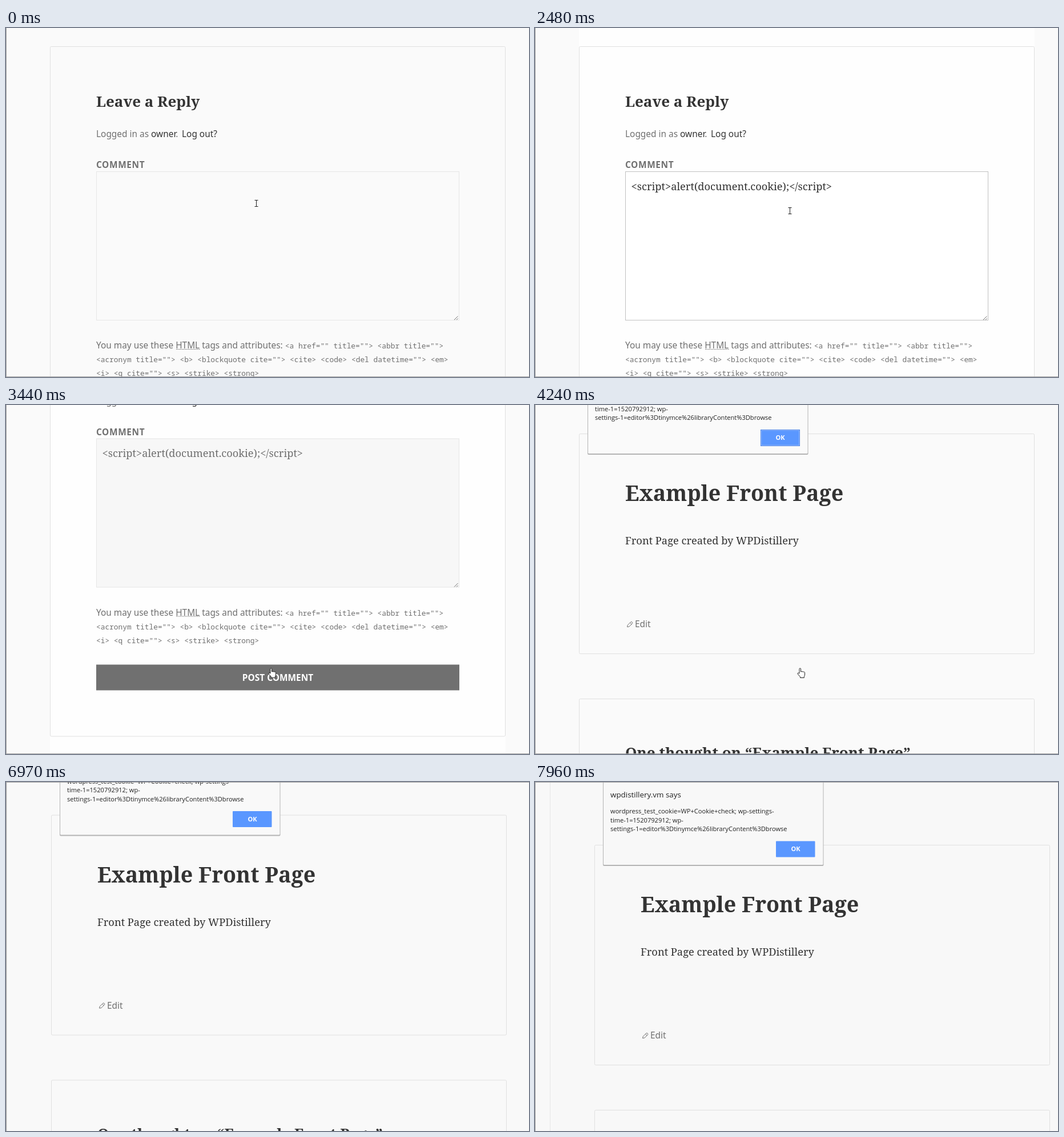
Animation, 916 px wide and 611 px high, one loop 8000 ms. Source, as an HTML page:

```html
<!DOCTYPE html>
<html lang="en">
<head>
<meta charset="utf-8">
<title>Comment form</title>
<style>
  html, body { margin: 0; width: 100%; height: 100%; overflow: hidden; background: #fafafa; }
  svg { display: block; width: 916px; height: 611px; }
  text { font: 15.42px "Noto Sans", sans-serif; fill: #707070; white-space: pre; }
  .dark { fill: #333; }
  .serif { font-family: "Noto Serif", serif; font-size: 18.25px; fill: #333; }
  .heading { font-size: 26px; font-weight: 700; }
  .title { font-size: 37.6px; font-weight: 700; }
  .label { font-weight: 700; letter-spacing: .04em; }
  .code { font: 12.85px "Noto Sans Mono", monospace; }
  .button { font-weight: 700; fill: #fff; text-anchor: middle; }
  .dialog text { font-family: "Open Sans", sans-serif; font-size: 11.1px; fill: #222; }
  .dialog .says { font-size: 13.4px; }
  .dialog .button { font-size: 11px; fill: #fff; }
  .card { fill: none; stroke: #e0e0e0; }
  .edge { fill: #a2a2a2; }
  .thin { fill: none; stroke: #707070; }
</style>
</head>
<body>
<svg viewBox="0 0 916 611">
  <rect id="backdrop" width="916" height="611"/>

  <g id="formView">
    <rect id="column" x="77" width="798" height="611" fill="#fefefe"/>
    <g id="form">
      <rect class="card" x="77.5" y="32.5" width="797" height="740" rx="2"/>
      <text class="serif heading" x="158" y="138">Leave a Reply</text>
      <text x="158" y="191">Logged in as <tspan class="dark">owner</tspan>. <tspan class="dark" x="308">Log out?</tspan></text>
      <text class="label" x="158" y="245">COMMENT</text>
      <rect id="area" x="158.5" y="251.5" width="635" height="260"/>
      <path class="thin" d="M785 511l6.5-6.5M789 511l2.5-2.5"/>
      <text id="typed" class="serif" x="168.5" y="283.5">&lt;script&gt;alert(document.cookie);&lt;/script&gt;</text>
      <rect id="caret" y="264" width="1" height="25" fill="#333"/>
      <text x="158" y="561">You may use these HTML tags and attributes: <tspan class="code">&lt;a href="" title=""&gt; &lt;abbr title=""&gt;</tspan></text>
      <path class="thin" d="M298 562.5h42" stroke-dasharray="1.5 1"/>
      <text class="code" x="158" y="585">&lt;acronym title=""&gt; &lt;b&gt; &lt;blockquote cite=""&gt; &lt;cite&gt; &lt;code&gt; &lt;del datetime=""&gt; &lt;em&gt;</text>
      <text class="code" x="158" y="609">&lt;i&gt; &lt;q cite=""&gt; &lt;s&gt; &lt;strike&gt; &lt;strong&gt;</text>
      <rect id="post" x="158" y="647" width="636" height="45"/>
      <text class="button" x="476" y="675.5">POST COMMENT</text>
    </g>
  </g>

  <g id="frontView">
    <g id="trail">
      <rect data-from="4550" x="459" y="408" width="23" height="70" fill="#f1f1f1"/>
      <rect data-from="4690" x="468" y="332" width="17" height="94" fill="#f6f6f6"/>
      <path data-from="4830" d="M472 224h27v107h-31v-19h4z" fill="#fefefe"/>
      <rect data-from="4970" x="485" y="88" width="59" height="153" fill="#fefefe"/>
      <rect data-from="5110" x="531" y="50" width="42" height="56" fill="#fefefe"/>
      <rect data-from="5110" x="531" y="15" width="42" height="35" fill="#f1f1f1"/>
    </g>
    <rect x="-1" y="-70" width="1" height="700" fill="#e6e6e6"/>
    <rect class="card" x="77.5" y="50.5" width="797" height="385" rx="2"/>
    <text class="serif title" x="158" y="168">Example Front Page</text>
    <text class="serif" x="158" y="244">Front Page created by WPDistillery</text>
    <path class="thin" d="M161.5 388.5l.8-3.2 5.6-5.6q1.2-.6 2.3.5 1 1.1.3 2.3l-5.6 5.5zM166.5 381.2l2.7 2.6"/>
    <text x="175" y="389">Edit</text>
    <rect class="card" x="77.5" y="514.5" width="797" height="400" rx="2"/>
    <text class="serif heading" x="158" y="617.5">One thought on “Example Front Page”</text>

    <g id="dialog" class="dialog">
      <rect x="92" y="-80" width="386.5" height="167" rx="2" fill="#b4b4b4"/>
      <rect id="panel" x="93" y="-80" width="384.5" height="165" rx="1.5"/>
      <text class="says" x="105" y="-33">wpdistillery.vm says</text>
      <text x="105" y="-4.7">wordpress_test_cookie=WP+Cookie+check; wp-settings-</text>
      <text x="105" y="10.7">time-1=1520792912; wp-</text>
      <text x="105" y="26">settings-1=editor%3Dtinymce%26libraryContent%3Dbrowse</text>
      <rect x="395" y="43.5" width="68.5" height="28" rx="1" fill="#5a97ff"/>
      <g id="focusRing" fill="none">
        <rect x="395.5" y="43.5" width="68" height="28" stroke="#4d84e6"/>
        <rect x="396.5" y="44.5" width="66" height="26" stroke="#8fb7ff"/>
      </g>
      <text class="button" x="429.5" y="61">OK</text>
    </g>
  </g>

  <g id="cursor" stroke="#222">
    <path id="beam" fill="none" d="M-2.5-5.5H3.5M.5-5.5V5.5M-2.5 5.5H3.5"/>
    <path id="hand" fill="#fff" d="M4 10V2.2a1.3 1.3 0 0 1 2.6 0V7q1.2-.9 2.4 0 1.2-.8 2.4.3 1.6-.5 2.1 1V12q0 2-1.2 3.2V17.5H5.5V15.8L1 10.8Q.6 9 2.2 9z"/>
    <path id="arrow" fill="#fff" d="M.5.5V16.2L4.2 12.8 6.6 18.3 9 17.3 6.6 11.9H11.6z"/>
  </g>

  <rect class="edge" width="1" height="611"/>
  <rect id="bottomEdge" class="edge" y="610" width="916" height="1"/>
  <rect id="topEdge" class="edge" width="916" height="1"/>
</svg>

<script>
const LOOP = 8000;
const FOCUS = 130, PASTE = 1810, HOVER = 3050, BLUR = 3320, LOADED = 4120, ALERT = 4240, PAN = 6970;

// [time, shape, x, y]; no shape hides the cursor.
const cursorSteps = [
  [0, "beam", 438, 307], [130, "beam", 428, 309], [280, "beam", 417, 309],
  [700, "beam", 418, 310], [1260, "beam", 419, 311],
  [2090, "beam", 424, 312], [2225, "beam", 434, 316], [2360, "beam", 446, 320], [2490, "beam", 452, 321],
  [2910, "beam", 457, 380], [HOVER, "hand", 459, 460],
  [4550, "arrow", 470, 407], [4690, "arrow", 473, 332], [4830, "arrow", 487, 224],
  [4970, "arrow", 532, 88], [5110, "arrow", 561, 15], [5250],
  [5810, "beam", 456, 16], [5970, "arrow", 445, 30], [6110, "arrow", 425, 48],
  [6250, "arrow", 400, 59], [6390, "arrow", 366, 59], [6530, "arrow", 343, 45],
  [6670, "arrow", 337, 12], [6810]
];
const scrollSteps = [[0, 0], [2490, 40], [2625, 96], [2760, 112], [2910, 192.5]];
const caretSteps = [[0, false], [FOCUS, true], [700, false], [1260, true], [2360, false], [2760, true], [BLUR, false]];
const panTimes = [PAN, 7120, 7270, 7420, 7570, 7700, 7830, 7960];

const $ = id => document.getElementById(id);
const show = (el, on) => el.setAttribute("visibility", on ? "inherit" : "hidden");
const move = (el, x, y) => el.setAttribute("transform", `translate(${x} ${y})`);
const paint = (el, fill, stroke = "none") => { el.setAttribute("fill", fill); el.setAttribute("stroke", stroke); };
const current = (steps, t) => steps.findLast(step => step[0] <= t);

function drawForm(t) {
  const scroll = current(scrollSteps, t)[1];
  move($("form"), 0, -scroll);
  show($("column"), t >= 2090);

  if (t < FOCUS) paint($("area"), "#fafafa", "#e6e6e6");
  else if (t < BLUR) paint($("area"), "#fff", "#c1c1c1");
  else paint($("area"), "#f7f7f7", "#e6e6e6");

  show($("typed"), t >= PASTE);
  $("typed").style.fill = t < BLUR ? "#333" : "#707070";
  show($("caret"), current(caretSteps, t)[1]);
  $("caret").setAttribute("x", t < PASTE ? 169 : 521);
  paint($("post"), t < HOVER ? "#333" : "#707070");
}

function drawFront(t, background) {
  const step = panTimes.filter(time => time <= t).length;
  move($("frontView"), Math.round(2.125 * step + 0.15625 * step * step), 7.5 * step);
  show($("dialog"), t >= ALERT);
  show($("focusRing"), t >= ALERT && t < PAN);
  paint($("panel"), background);
  for (const patch of $("trail").children) show(patch, t >= patch.dataset.from && t < PAN);
}

function drawCursor(t) {
  const [, shape, x = 0, y = 0] = current(cursorSteps, t);
  move($("cursor"), x, y);
  for (const el of $("cursor").children) show(el, el.id === shape);
}

function draw(t) {
  const background = t < PAN ? "#fafafa" : t < 7700 ? "#f9f9f9" : "#f8f8f8";
  paint($("backdrop"), background);
  $("formView").style.display = t < LOADED ? "" : "none";
  $("frontView").style.display = t < LOADED ? "none" : "";
  if (t < LOADED) drawForm(t);
  else drawFront(t, background);
  drawCursor(t);
  show($("bottomEdge"), t < PAN);
  show($("topEdge"), t >= PAN);
}

const start = performance.now();
function tick() {
  draw((performance.now() - start) % LOOP);
  requestAnimationFrame(tick);
}
tick();
</script>
</body>
</html>
```
